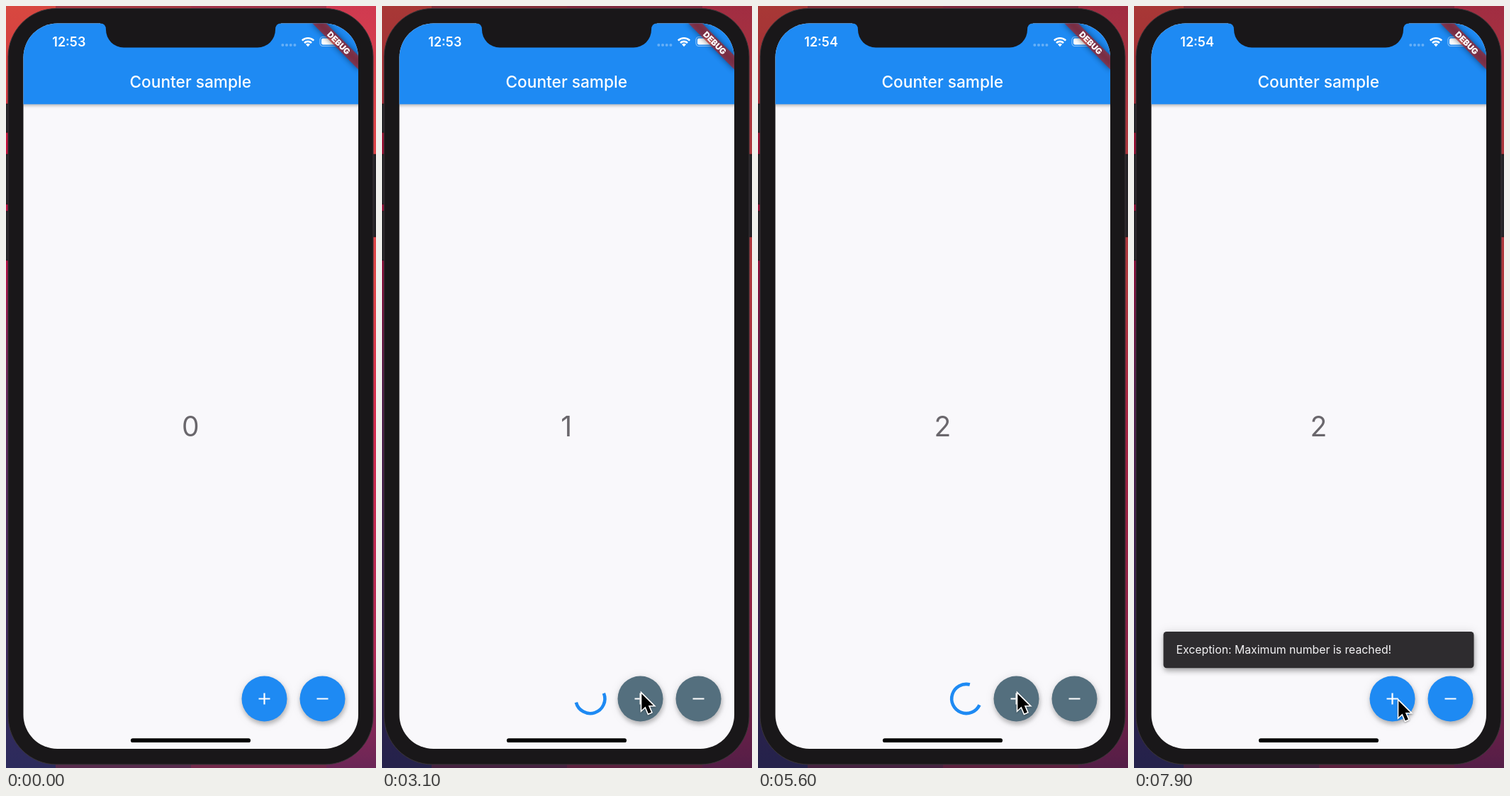
Animation, 522 px wide and 1073 px high, one loop 8000 ms. Source, as an HTML page:

```html
<!DOCTYPE html>
<html lang="en">
<head>
<meta charset="utf-8">
<title>Counter sample</title>
<style>
html, body { margin: 0; width: 100%; height: 100%; overflow: hidden; background: #1a181a; }
svg { display: block; width: 522px; height: 1073px; font-family: Inter, "Liberation Sans", sans-serif; }
.fab { filter: drop-shadow(1px 4px 3px rgba(0,0,0,.24)) drop-shadow(0 1px 6px rgba(0,0,0,.1)); }
.bar { filter: drop-shadow(0 2px 2px rgba(0,0,0,.28)); }
.toast { filter: drop-shadow(1px 4px 3px rgba(0,0,0,.26)) drop-shadow(0 1px 7px rgba(0,0,0,.14)); }
</style>
</head>
<body>
<svg viewBox="0 0 522 1073">
  <defs>
    <linearGradient id="left" x2="0" y2="1">
      <stop offset="0" stop-color="#d84840"/>
      <stop offset=".12" stop-color="#d23a40"/>
      <stop offset=".18" stop-color="#c3123c"/>
      <stop offset=".34" stop-color="#b01246"/>
      <stop offset=".5" stop-color="#68285c"/>
      <stop offset=".75" stop-color="#45285c"/>
      <stop offset="1" stop-color="#2c2b5c"/>
    </linearGradient>
    <linearGradient id="right" x2="0" y2="1">
      <stop offset="0" stop-color="#d03a50"/>
      <stop offset=".15" stop-color="#dd454a"/>
      <stop offset=".36" stop-color="#e0484a"/>
      <stop offset=".55" stop-color="#d42c50"/>
      <stop offset=".85" stop-color="#b02a56"/>
      <stop offset="1" stop-color="#6a2656"/>
    </linearGradient>
    <clipPath id="screen"><rect x="24.5" y="24.5" width="472.5" height="1021.5" rx="48"/></clipPath>
    <clipPath id="toastArea"><rect x="24" y="860" width="474" height="83.5"/></clipPath>
    <filter id="soft" x="-20%" y="-200%" width="140%" height="500%"><feGaussianBlur stdDeviation="4"/></filter>
  </defs>

  <rect width="261" height="1073" fill="url(#left)"/>
  <rect x="261" width="261" height="1073" fill="url(#right)"/>
  <rect x="70" width="382" height="1073" fill="#7a2c42" opacity=".55"/>
  <rect id="shade" width="522" height="1073" fill="#100818" opacity="0"/>

  <g fill="#242226" stroke="#111" stroke-width=".8">
    <rect x="-3" y="138" width="8" height="40"/>
    <rect x="-3" y="209" width="8" height="70"/>
    <rect x="-3" y="289" width="8" height="69"/>
    <rect x="516" y="209" width="9" height="116"/>
  </g>
  <rect x="3" y="3.5" width="515" height="1064.5" rx="68" fill="#191719" stroke="#3a3538" stroke-width="1"/>

  <g clip-path="url(#screen)">
    <rect x="24" y="24" width="474" height="1023" fill="#f9f8fb"/>
    <rect class="bar" x="20" y="20" width="482" height="118.3" fill="#1e8af3"/>
    <text x="260.3" y="114.6" font-size="22.7" font-weight="500" fill="#fff" text-anchor="middle">Counter sample</text>
    <text id="count" x="260.3" y="606" font-size="39" fill="#6a676c" text-anchor="middle">0</text>

    <g clip-path="url(#toastArea)">
      <g id="toast" opacity="0">
        <rect class="toast" x="41.5" y="881" width="438" height="51.3" rx="4.5" fill="#2e2c2f"/>
        <text x="59.5" y="911.7" font-size="15.8" fill="#f4f3f5">Exception: Maximum number is reached!</text>
      </g>
    </g>

    <path id="spin" fill="none" stroke="#1e8af3" stroke-width="4.57"/>
    <g id="fabs" fill="#1e8af3">
      <circle class="fab" cx="364.5" cy="975.5" r="32"/>
      <circle class="fab" cx="446.5" cy="975.5" r="32"/>
    </g>
    <path d="M356.5 975.5h16M364.5 967.5v16M438.5 975.5h16" stroke="#fff" stroke-width="2.2"/>

    <text id="clock" x="65.3" y="56.6" font-size="18" font-weight="600" fill="#fff">12:53</text>
    <g fill="#fff" opacity=".32">
      <circle cx="390.3" cy="55" r="2"/><circle cx="396" cy="55" r="2"/>
      <circle cx="401.7" cy="55" r="2"/><circle cx="407.4" cy="55" r="2"/>
    </g>
    <g fill="none" stroke="#fff" stroke-width="2.6">
      <path d="M417.8 48.6a11.6 11.6 0 0 1 16.4 0"/>
      <path d="M421 52a7 7 0 0 1 10 0"/>
    </g>
    <path d="M426 57.2l-3-3.1a4.3 4.3 0 0 1 6 0z" fill="#fff"/>
    <rect x="443" y="43.5" width="26" height="13" rx="4" fill="none" stroke="#fff" stroke-opacity=".5" stroke-width="1.1"/>
    <rect x="445" y="45.4" width="22" height="9.2" rx="2.3" fill="#fff"/>
    <path d="M470.6 48q2 2 0 4.4z" fill="#fff" opacity=".5"/>

    <g transform="translate(497 24.5) rotate(45)">
      <rect x="-46" y="32" width="92" height="13.7" opacity=".5" filter="url(#soft)"/>
      <rect x="-46" y="32" width="92" height="13.7" fill="#b71c1c" fill-opacity=".627"/>
      <text y="43.1" font-size="11.6" font-weight="900" fill="#fff" text-anchor="middle">DEBUG</text>
    </g>
    <rect x="176" y="1031.3" width="169" height="5.7" rx="2.85"/>
  </g>

  <path fill="#191719" d="M133 23V24.5Q141 24.5 141 33.5A25 25 0 0 0 166 58.5H355A25 25 0 0 0 380 33.5Q380 24.5 388 24.5V23Z"/>

  <path id="cursor" d="M1.3 2.4V25.4L6.6 20.4L10.8 30.3L14.9 28.5L10.8 18.9H17.9Z"
    fill="#000" stroke="#fff" stroke-width="3.2" stroke-linejoin="miter" paint-order="stroke"
    style="filter: drop-shadow(0 1px 1.2px rgba(0,0,0,.35))"/>
</svg>
<script>
const LOOP = 8000, WAIT = 1000, TAPS = [1200, 2805, 5100];
const FOCUS = 900, MINUTE = 5500, TOAST = TAPS[2] + WAIT;
const el = id => document.getElementById(id);
const clamp = v => Math.min(1, Math.max(0, v));
const mix = (a, b, k) => a + (b - a) * k;
const smooth = k => k * k * (3 - 2 * k);
const span = (t, a, b) => clamp((t - a) / (b - a));

// cubic-bezier(.4, 0, .2, 1)
function standard(x) {
  let lo = 0, hi = 1;
  for (let i = 0; i < 18; i++) {
    const u = (lo + hi) / 2, v = 1 - u;
    if (1.2 * v * v * u + .6 * v * u * u + u ** 3 < x) lo = u; else hi = u;
  }
  return lo * lo * (3 - 2 * lo);
}

function arc(ms) {
  const phase = ms / 1333 % 1, turn = Math.PI * 2;
  const head = standard(clamp(phase * 2)), tail = standard(clamp(phase * 2 - 1));
  const from = turn * (-.25 + tail * .75 + ms / 2222 % 1 + phase * .25);
  const sweep = Math.max((head - tail) * turn * .75, .001);
  const at = a => `${293.8 + 20.6 * Math.cos(a)} ${975.5 + 20.6 * Math.sin(a)}`;
  return `M${at(from)}A20.6 20.6 0 ${sweep > Math.PI ? 1 : 0} 1 ${at(from + sweep)}`;
}

function draw(t) {
  const tap = TAPS.find(s => t >= s && t < s + WAIT);
  const busy = tap !== undefined;
  el('spin').setAttribute('d', busy ? arc(t - tap) : '');
  el('fabs').setAttribute('fill', busy ? '#546f7e' : '#1e8af3');
  el('count').textContent = TAPS.slice(0, 2).filter(s => t >= s + WAIT).length;
  el('clock').textContent = t < MINUTE ? '12:53' : '12:54';
  el('toast').setAttribute('opacity', span(t, TOAST + 100, TOAST + 250));
  el('shade').setAttribute('opacity', t < FOCUS ? 0 : .24);

  const enter = smooth(span(t, 400, 850)), leave = smooth(span(t, 7500, 7800));
  const x = mix(530, 365, enter) + 7 * leave;
  const y = mix(860, 966, enter) + 10 * leave;
  el('cursor').setAttribute('transform', `translate(${x} ${y})`);
}

function tick() {
  draw(performance.now() % LOOP);
  requestAnimationFrame(tick);
}
tick();
</script>
</body>
</html>
```
